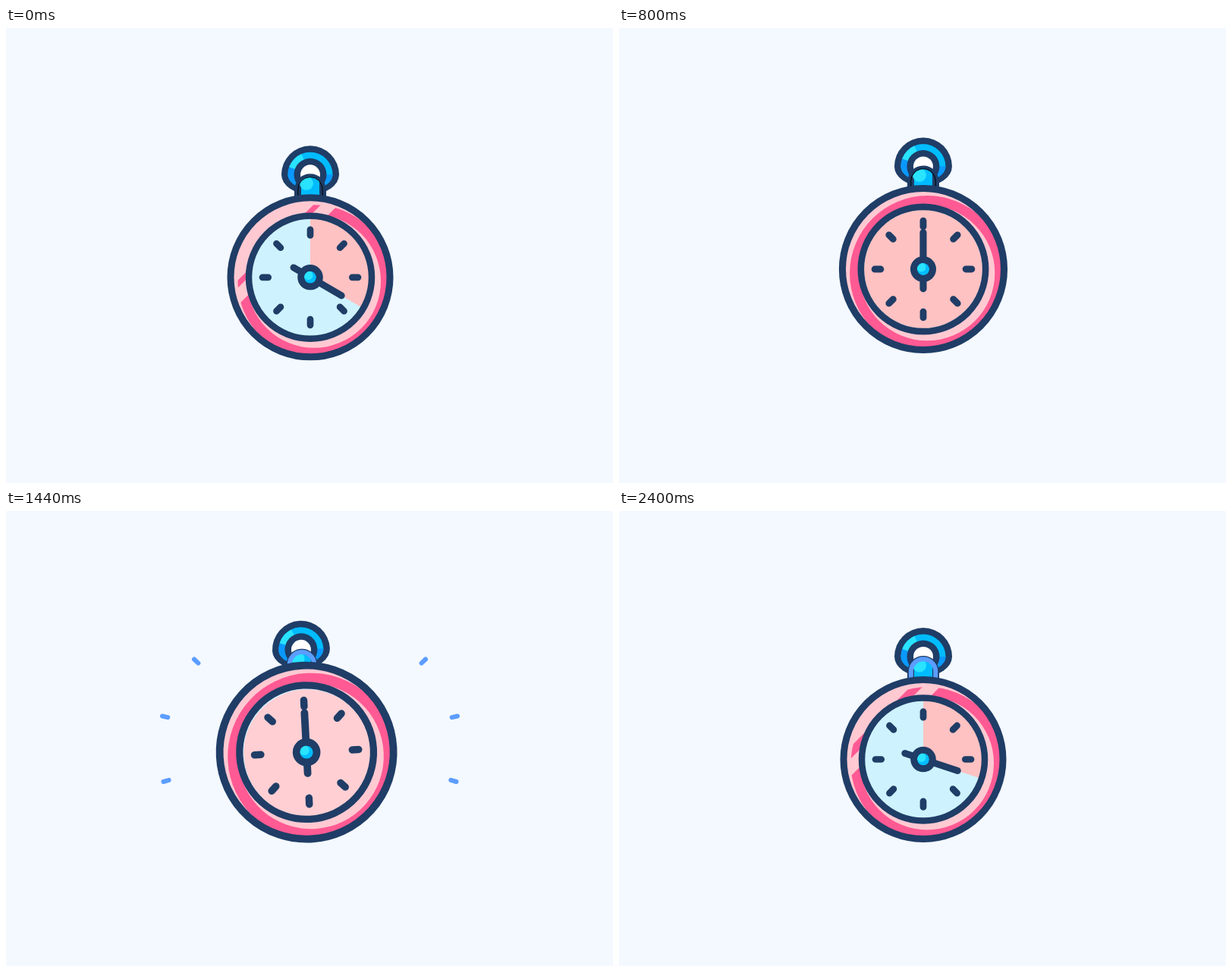
An HTML page with a canvas for the animation above (2440 ms loop, 800 px wide and 600 px high).

```html
<!DOCTYPE html>
<html lang="en">
<head>
<meta charset="utf-8">
<title>Stopwatch</title>
<style>
  html, body { margin: 0; width: 100%; height: 100%; overflow: hidden; background: #f4f9ff; }
  canvas { display: block; }
</style>
</head>
<body>
<canvas id="stage" width="800" height="600"></canvas>
<script>
const ctx = document.getElementById('stage').getContext('2d');
const LOOP = 2440, TAU = Math.PI * 2, RAD = Math.PI / 180;
const NAVY = '#1f3d66', BLUSH = '#ffc9d2', PINK = '#ff5a93';
const BLUE = '#00bcff', CYAN = '#29e3ff', DEEP = '#0a98ff', FACE = '#cff2ff';

const progress = (t, from, to) => Math.min(1, Math.max(0, (t - from) / (to - from)));
const smooth = (t, from, to) => { const u = progress(t, from, to); return u * u * (3 - 2 * u); };

function disc(x, y, r, color) {
  ctx.beginPath();
  ctx.arc(x, y, r, 0, TAU);
  ctx.fillStyle = color;
  ctx.fill();
}

function ring(r, width) {
  ctx.beginPath();
  ctx.arc(0, 0, r, 0, TAU);
  ctx.strokeStyle = NAVY;
  ctx.lineWidth = width;
  ctx.stroke();
}

function line(x1, y1, x2, y2, width, color = NAVY) {
  ctx.beginPath();
  ctx.moveTo(x1, y1);
  ctx.lineTo(x2, y2);
  ctx.lineCap = 'round';
  ctx.lineWidth = width;
  ctx.strokeStyle = color;
  ctx.stroke();
}

function wedge(r, from, to, color) {
  ctx.beginPath();
  ctx.moveTo(0, 0);
  ctx.arc(0, 0, r, from * RAD, to * RAD);
  ctx.fillStyle = color;
  ctx.fill();
}

function loopShape(r, bottom) {
  ctx.beginPath();
  ctx.arc(0, 0, r, Math.PI, 0);
  ctx.ellipse(0, 0, r, bottom, 0, 0, Math.PI);
}

function drawCrown() {
  ctx.save();
  ctx.translate(0, -135.5);
  loopShape(38, 26);
  ctx.fillStyle = NAVY;
  ctx.fill();
  ctx.save();
  loopShape(29.5, 19);
  ctx.clip();
  disc(0, 0, 40, BLUE);
  wedge(40, 0, 60, DEEP);
  wedge(40, 120, 200, DEEP);
  wedge(40, 200, 247, CYAN);
  ctx.restore();
  disc(0, 0, 21.5, NAVY);
  disc(0, 0, 13, '#fff');
  ctx.restore();

  ctx.fillStyle = NAVY;
  ctx.fillRect(-21, -115, 42, 16);
  ctx.save();
  ctx.beginPath();
  ctx.arc(0, -116, 16.2, Math.PI, 0);
  ctx.lineTo(16.2, -98);
  ctx.lineTo(-16.2, -98);
  ctx.closePath();
  ctx.strokeStyle = NAVY;
  ctx.lineWidth = 8.5;
  ctx.stroke();
  ctx.clip();
  ctx.fillStyle = BLUE;
  ctx.fillRect(-12, -140, 24, 45);
  disc(-5, -124, 9, CYAN);
  ctx.restore();
  ctx.beginPath();
  ctx.arc(0, -116, 16.2, Math.PI, 0);
  ctx.lineTo(16.2, -98);
  ctx.moveTo(-16.2, -116);
  ctx.lineTo(-16.2, -98);
  ctx.lineCap = 'butt';
  ctx.stroke();
}

// Two diagonal glints sweep over the case; the wide one catches up with the narrow one.
function drawGlints(t) {
  const s = t > 1400 ? t - LOOP : t;
  const glint = (from, to) => ctx.fillRect(from / Math.SQRT2, -150, (to - from) / Math.SQRT2, 300);
  ctx.save();
  ctx.rotate(Math.PI / 4);
  ctx.fillStyle = BLUSH;
  glint(-82 + 0.375 * s, -59 + 0.375 * s);
  glint(-172 + 0.525 * s, -92 + 0.525 * s);
  ctx.restore();
}

function drawCase(t) {
  ctx.save();
  ctx.beginPath();
  ctx.arc(0, 0, 105, 0, TAU);
  ctx.clip();
  disc(0, 0, 105, BLUSH);
  disc(5.5, 5.5, 101, PINK);
  disc(5, 5, 88, BLUSH);
  drawGlints(t);
  ctx.restore();
  ring(105, 9);
}

const DIAL = [
  [1280, 255, 194, 194], [1440, 255, 207, 211],
  [1760, 223, 233, 243], [1900, 207, 242, 255]
];

function dialColor(t) {
  let i = 0;
  while (i < DIAL.length - 2 && t > DIAL[i + 1][0]) i++;
  const a = DIAL[i], b = DIAL[i + 1], u = progress(t, a[0], b[0]);
  return `rgb(${[1, 2, 3].map(k => Math.round(a[k] + (b[k] - a[k]) * u))})`;
}

function drawDial(t, turn, tilt) {
  disc(0, 0, 81, FACE);
  const full = t >= 800 && t < 2040;
  if (full) disc(-0.3 * tilt, 0.3 * Math.abs(tilt), tilt ? 76.9 : 80, dialColor(t));
  else wedge(80, -90, turn - 90, '#ffc2c2');
  ring(81, 8.5);

  for (let i = 0; i < 8; i++) {
    ctx.save();
    ctx.rotate(i * Math.PI / 4);
    line(0, -55.3, 0, -63, 8.7);
    ctx.restore();
  }
  ctx.save();
  ctx.rotate(turn * RAD);
  line(0, 25.5, 0, -47.7, 9);
  ctx.restore();

  disc(0, 0, 16.8, NAVY);
  ctx.save();
  ctx.beginPath();
  ctx.arc(0, 0, 8, 0, TAU);
  ctx.clip();
  disc(0, 0, 8, BLUE);
  disc(-2.5, -2.5, 6, CYAN);
  ctx.restore();
}

// Outer end and outward direction of each spark on the left; the right side mirrors it.
const SPARKS = [[248, 195.5, -0.72, -0.69], [206, 270.5, -0.975, -0.22], [207.5, 357, -0.96, 0.28]];

function drawSparks(t) {
  if (t <= 840 || t >= 1665) return;
  const remaining = end => 60 * (1 - progress(t, 840, end)) ** 1.6;
  const head = remaining(1440), tail = remaining(1665);
  for (const [x, y, dx, dy] of SPARKS) {
    const x1 = x - dx * head, y1 = y - dy * head;
    const x2 = x - dx * tail, y2 = y - dy * tail;
    line(x1, y1, x2, y2, 6, '#5c9dff');
    line(801 - x1, y1, 801 - x2, y2, 6, '#5c9dff');
  }
}

function draw(t) {
  const s = t < 2040 ? t + LOOP : t;
  const turn = s < 2040 + 1200 ? (s - 2040) * 0.3 : 0;
  const drop = 14 * (smooth(s, 2040, 2620) - smooth(s, 2620, 3240));
  const scale = 1 + 0.092 * (smooth(t, 600, 1400) - smooth(t, 1400, 2000));
  const swing = progress(t, 800, 1120) - progress(t, 1120, 1760);
  const tilt = -6.1 * swing * Math.cos((t - 1120) / 160 * TAU);

  ctx.fillStyle = '#f4f9ff';
  ctx.fillRect(0, 0, 800, 600);
  drawSparks(t);

  ctx.save();
  ctx.translate(401, 410 + drop);
  ctx.rotate(tilt * RAD);
  ctx.translate(0, -92);
  drawCrown();
  ctx.scale(scale, scale);
  drawCase(t);
  drawDial(t, turn, tilt);
  ctx.restore();
}

function tick() {
  draw(performance.now() % LOOP);
  requestAnimationFrame(tick);
}
tick();
</script>
</body>
</html>
```
